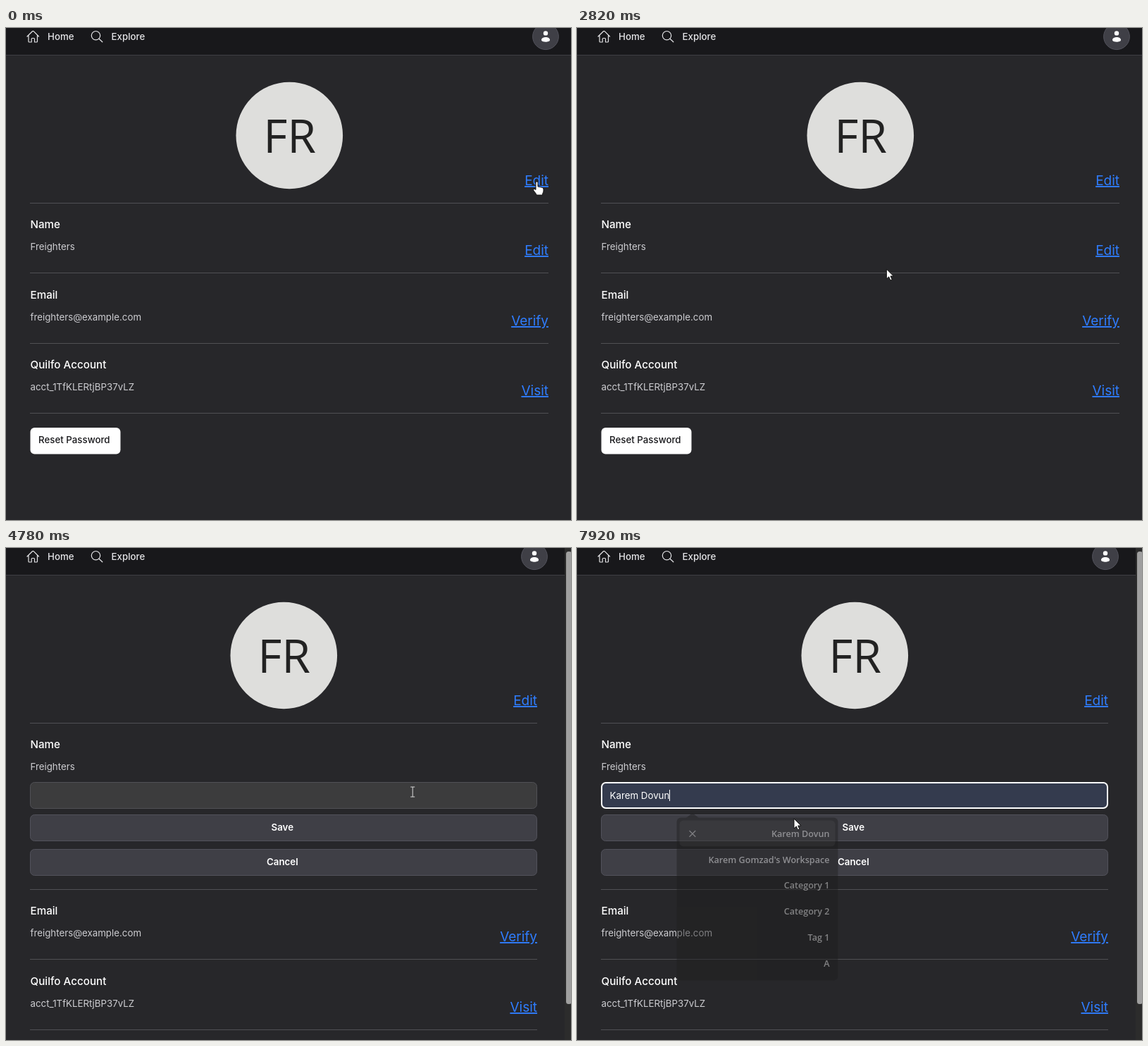
Recreate the animation shown at these times as an HTML page. Size 802 by 698 pixels, loop 8 s.

```html
<!DOCTYPE html>
<html lang="en">
<head>
<meta charset="utf-8">
<title>Profile settings</title>
<style>
  html, body { margin: 0; height: 100%; overflow: hidden; background: #27272a; }
  svg { display: block; width: 802px; height: 698px; font: 13.3px Inter, sans-serif; font-optical-sizing: none; fill: #fff; }
  .nav { font-weight: 500; fill: #e4e4e7; }
  .icon { fill: none; stroke: #e4e4e7; stroke-width: 1.2; stroke-linecap: round; stroke-linejoin: round; }
  .heading { font-weight: 500; font-size: 15.2px; }
  .value { fill: #cdcdd1; }
  .link { font-size: 19px; fill: #2f7dff; text-anchor: end; text-decoration: underline; }
  .rule { fill: #505054; }
  .button { fill: #3f3f46; stroke: #52525b; }
  .label { font-weight: 600; text-anchor: middle; }
  .initials { font: 66px "Open Sans", sans-serif; fill: #222; }
  .suggestion { font: 600 13px "Open Sans", sans-serif; fill: #f0f0f0; text-anchor: end; }
  .cursor { fill: #fff; stroke: #111; stroke-width: 1; stroke-linejoin: round; }
  #ibeam { fill: none; stroke: #d8d8d8; }
</style>
</head>
<body>
<svg id="stage" viewBox="0 0 802 698"></svg>
<script>
const LOOP = 8000;
const PERSON = 'Karem Dovun';
const SUGGESTIONS = [PERSON, "Karem Gomzad's Workspace", 'Category 1', 'Category 2', 'Tag 1', 'A'];
const ROWS = [
  ['Name', 'Freighters', 'Edit'],
  ['Email', 'freighters@example.com', 'Verify'],
  ['Quilfo Account', 'acct_1TfKLERtjBP37vLZ', 'Visit'],
];
const FIRST_RULE = 248.3, ROW_HEIGHT = 99.4;

// Cursor waypoints: time, x, y
const PATH = [
  [0, 754, 218], [240, 754, 218], [630, 693, 275],
  [960, 693, 275], [1650, 433, 340],
  [2700, 433, 340], [2820, 439, 342], [3370, 628, 350],
  [3440, 628, 350], [3770, 696, 342], [4230, 753, 310],
  [4470, 753, 310], [4780, 578, 346], [5100, 329, 353], [5240, 308, 356],
  [6670, 308, 356], [6950, 308, 384], [LOOP, 308, 384],
];
// Click highlights: from, to, x, y
const CLICKS = [
  [80, 240, 754, 218], [2440, 2590, 432, 340], [4310, 4470, 753, 310],
  [5810, 5880, 306, 355.5], [7760, 7840, 308, 384],
];

const text = (x, y, cls, str, extra = '') =>
  `<text x="${x}" y="${Math.round(y)}" class="${cls}" ${extra}>${str}</text>`;
const box = (x, y, w, h, attrs) =>
  `<rect x="${x}" y="${y}" width="${w}" height="${h}" rx="6" ${attrs}/>`;
const rule = (y, right) =>
  `<rect x="34" y="${Math.floor(y)}" width="${right - 34}" height="1" class="rule"/>`;
const wideButton = (id, y, label) =>
  box(34.5, y + .5, 719, 37, `class="button" id="${id}"`) + text(392.3, y + 23, 'label', label);

function row(index, y, right, editing) {
  const [heading, value, link] = ROWS[index];
  return text(34.5, y + 36, 'heading', heading) + text(34.5, y + 67, 'value', value) +
    (editing ? '' : text(right, y + 74, 'link', link));
}

// Consecutive rows from index `first`, each closed by a rule
const rows = (first, top, right) => ROWS.slice(first).map((_, i) => {
  const y = top + i * ROW_HEIGHT;
  return row(first + i, y, right) + rule(y + ROW_HEIGHT, right);
}).join('');

function frame(right, thumbEnd) {
  const middle = right / 2 + 17.3, user = right - 4, edge = thumbEnd ? 793 : 802;
  return `<rect width="${edge}" height="38" fill="#18181b"/>
    <rect y="38" width="${edge}" height="1" fill="#3f3f43"/>
    <path class="icon" d="M30 12 37.4 4.7q.9-.8 1.8 0L46.5 12M32 10.2V19q0 1 1 1h3.2v-4.5q0-1 1-1h2.3q1 0 1 1V20h3q1 0 1-1v-8.8"/>
    <path class="icon" d="M133.7 10.7a6.2 6.2 0 1 1-12.4 0a6.2 6.2 0 1 1 12.4 0M132 15.2l4.8 4.6"/>
    ${text(59, 17, 'nav', 'Home')}${text(149.5, 17, 'nav', 'Explore')}
    <circle cx="${user}" cy="12.2" r="18.4" class="button"/>
    <circle cx="${user}" cy="7.4" r="3.2"/>
    <path d="M${user - 6} 17c0-5.2 12-5.2 12 0c0 3.6-12 3.6-12 0"/>
    <circle cx="${middle}" cy="152.5" r="75.8" fill="#dededc"/>
    ${text(middle - 37, 177, 'initials', 'FR')}
    ${thumbEnd ? `<rect x="793" width="9" height="698" fill="#2c2c2c"/>
      <rect x="795" y="5" width="8" height="${thumbEnd - 5}" rx="3.5" fill="#9f9f9f"/>` : ''}`;
}

function viewPage() {
  return frame(770, 0) + text(770, 223, 'link', 'Edit') + rule(FIRST_RULE, 770) + rows(0, FIRST_RULE, 770) +
    box(34.5, 567, 128, 37.5, '') + text(46, 589, '', 'Reset Password', 'font-weight="500" fill="#18181b"');
}

function photoPage() {
  const top = 380.6;
  return frame(754, 651) +
    box(34.5, 228.5, 103, 37, 'class="button"') + text(86.5, 251, 'label', 'Choose file') +
    text(153.5, 251, '', 'No file chosen', 'fill="#a1a1aa"') +
    wideButton('photoSave', 274, 'Save') + wideButton('photoCancel', 323.5, 'Cancel') +
    rule(top, 754) + rows(0, top, 754);
}

function namePage() {
  const top = 484.3;
  return frame(754, 647) + text(754, 223, 'link', 'Edit') +
    rule(FIRST_RULE, 754) + row(0, FIRST_RULE, 754, true) +
    box(34.5, 332.5, 719, 37, 'id="field"') + text(46.5, 356, '', PERSON, 'id="entry"') +
    '<rect id="caret" y="343" width="1" height="16"/>' +
    wideButton('nameSave', 378, 'Save') + wideButton('nameCancel', 427, 'Cancel') +
    rule(top, 754) + rows(1, top, 754) +
    `<g id="popup">
      <path d="M151 380l7.5-6q2.5-2 5 0l7.5 6z" fill="#1e1e1e"/>
      ${box(138, 379, 236, 238, 'fill="#1e1e1e"')}
      <g id="highlight">${box(142, 383, 228, 38, 'fill="#333"')}
        <path d="M156.5 398l9 9m0-9l-9 9" stroke="#ccc" stroke-width="1.3"/></g>
      ${SUGGESTIONS.map((s, i) => text(361.7, 407 + i * 38, 'suggestion', s)).join('')}
    </g>`;
}

document.getElementById('stage').innerHTML = `
  <rect width="802" height="698" fill="#27272a"/>
  <g id="view">${viewPage()}</g><g id="photo">${photoPage()}</g><g id="name">${namePage()}</g>
  <g id="pointer">
    <path id="arrow" class="cursor" d="M0 0V14l3.3-3.1 2.2 5 2.4-1-2.2-4.9H10z"/>
    <path id="hand" class="cursor" d="M-2 1.5C-2-.5 1-.5 1 1.5V7l5 1c2 .4 3 1.4 3 3v2c0 2-1.5 3-1.5 6H-1c0-2-2-3-4-6.5-1-2 1-3 3-1z"/>
    <path id="ibeam" d="M-3-7H3M0-7V7M-3 7H3"/>
  </g>
  <circle id="click" r="12.7" fill="#ff0" opacity=".52"/>`;

const $ = id => document.getElementById(id);
const show = (id, on) => $(id).setAttribute('display', on ? 'inline' : 'none');
const set = (id, attrs) => Object.entries(attrs).forEach(([k, v]) => $(id).setAttribute(k, v));
const within = (v, a, b) => v >= a && v < b;

function cursorAt(t) {
  const i = PATH.findIndex(p => p[0] > t);
  const [t0, x0, y0] = PATH[i - 1], [t1, x1, y1] = PATH[i];
  const k = (t - t0) / (t1 - t0);
  return [x0 + (x1 - x0) * k, y0 + (y1 - y0) * k];
}

function cursorKind(page, x, y) {
  if (page === 'view') return x > 736 && (within(y, 206, 229) || within(y, 305, 329)) ? 'hand' : 'arrow';
  if (page === 'photo') return x < 754 && (within(y, 274, 312) || within(y, 323, 362)) ? 'hand' : 'arrow';
  return within(y, 332, 370) ? 'ibeam' : 'arrow';
}

function drawForm(t) {
  const focused = t >= 5810, hovered = t >= 6890, chosen = t >= 7760;
  const border = focused ? 2 : 1;
  set('field', {
    x: 34 + border / 2, y: 332 + border / 2, width: 720 - border, height: 38 - border,
    fill: hovered ? '#343b4e' : '#3c3c3d',
    stroke: focused ? '#fff' : '#505055',
    'stroke-width': border,
  });
  show('entry', hovered);
  show('highlight', hovered);
  show('caret', focused && (chosen || t < 6360 || within(t, 6890, 7440)));
  set('caret', { x: chosen ? Math.round(46.5 + $('entry').getComputedTextLength()) : 47 });

  const fade = Math.max(0, (t - 7800) / 120);
  const scale = (t < 5880 ? 1 : 1.012) - .042 * Math.min(fade, 1.3);
  show('popup', focused);
  set('popup', {
    opacity: Math.max(0, 1 - .55 * fade),
    transform: `translate(256 498) scale(${scale}) translate(-256 -498)`,
  });
}

function draw(t) {
  const page = within(t, 240, 2590) ? 'photo' : t >= 4470 ? 'name' : 'view';
  for (const p of ['view', 'photo', 'name']) show(p, p === page);

  const [x, y] = cursorAt(t), kind = cursorKind(page, x, y);
  for (const c of ['arrow', 'hand', 'ibeam']) show(c, c === kind);
  set('pointer', { transform: `translate(${x} ${y})` });

  const hoverFill = on => `fill: ${on ? '#484850' : '#3f3f46'}`;
  set('photoSave', { style: hoverFill(kind === 'hand' && y < 312) });
  set('photoCancel', { style: hoverFill(kind === 'hand' && y >= 323) });

  const click = CLICKS.find(c => within(t, c[0], c[1]));
  show('click', click);
  if (click) set('click', { cx: click[2], cy: click[3] });

  if (page === 'name') drawForm(t);
}

const start = performance.now();
function tick() {
  draw((performance.now() - start) % LOOP);
  requestAnimationFrame(tick);
}
tick();
</script>
</body>
</html>
```
